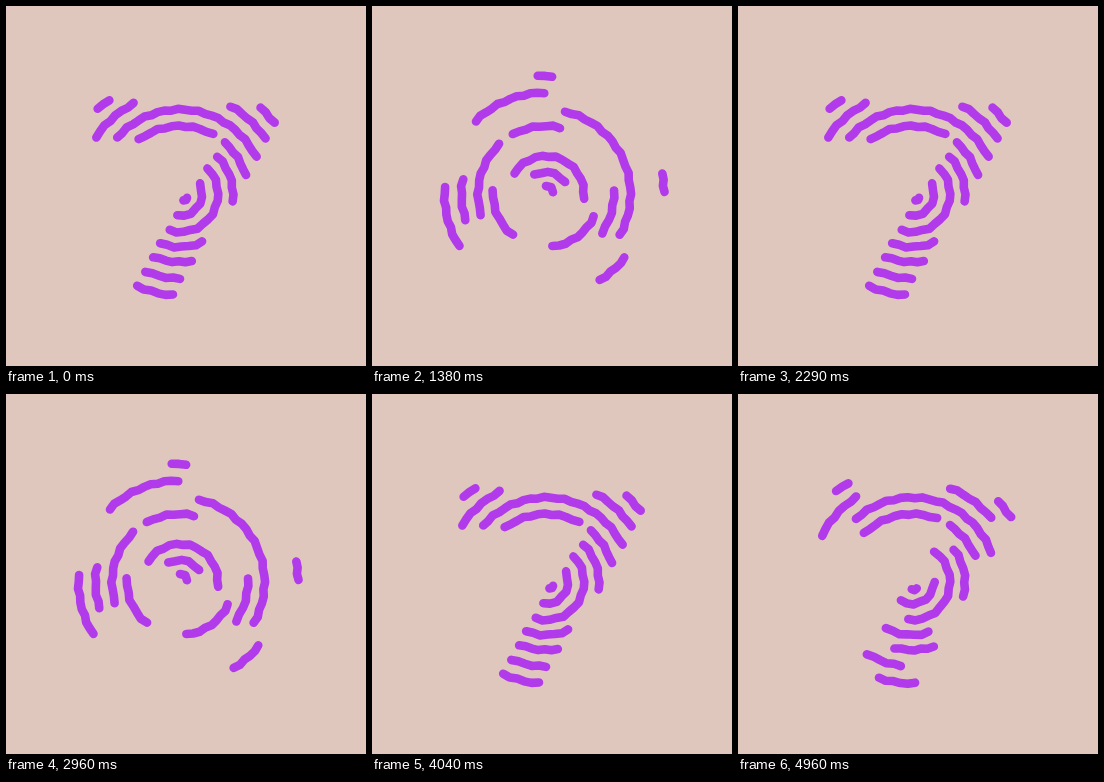
An HTML page with a canvas for the animation above (5000 ms loop, 360 by 360 pixels).

```html
<!DOCTYPE html>
<html lang="en">
<head>
<meta charset="utf-8">
<title>Seven</title>
<style>
html, body { margin: 0; width: 100%; height: 100%; overflow: hidden; background: #e0c7bd; }
canvas { display: block; width: 100vmin; height: 100vmin; }
</style>
</head>
<body>
<canvas id="stage" width="360" height="360"></canvas>
<script>
const ctx = document.getElementById('stage').getContext('2d');
const LOOP = 5000, CYCLE = 32, CX = 174, CY = 188;

// Arc angles in degrees: [start, end] at rest, half way back, and just after the spin.
const rings = [
  { r: 8, turn: 720, arcs: [[28, 62, 270, 346, 495, 495]] },
  { r: 22, turn: 720, arcs: [[-28, 97, 239, 328, 401, 512]] },
  { r: 38, turn: -360, arcs: [[-43, 106, -147, 7, -217, -76]] },
  { r: 53, turn: 360, arcs: [[-45, 8, 25, 83, 99, 159], [65, 112, 129, 184, 200, 262]] },
  { r: 68, turn: -360, arcs: [[233, 299, 162, 227, 129, 197], [311, 344, 241, 282, 207, 247], [80, 113, -3, 35, -56, -15]] },
  { r: 84.5, turn: 360, arcs: [[222, 334, 283, 389, 336, 455], [90, 114, 162, 190, 220, 220]] },
  { r: 101.5, turn: -360, arcs: [[300, 327, 226, 269, 166, 226], [94, 115, 39, 58, 15, 33], [214, 243, 149, 184, 94, 141]] },
  { r: 118, turn: 360, arcs: [[226, 233, 266, 273, 286, 286], [-47, -37, -10, -1, 10, 20]] }
];

// Uneven stepping: [time in ms, step reached]
const pace = [
  [0, 0], [40, 1], [540, 11], [580, 12], [1080, 21], [1130, 22], [1630, 34],
  [1670, 35], [2170, 46], [2250, 47], [2290, 48], [2380, 49], [2750, 55],
  [2790, 56], [2960, 60], [3290, 66], [3330, 67], [3580, 72], [3670, 73],
  [3790, 75], [3880, 76], [4380, 85], [4420, 86], [4920, 98], [4960, 99], [5000, 100]
];

const mix = (a, b, u) => a + (b - a) * u;

function stepAt(t) {
  let i = 0;
  while (i < pace.length - 2 && t >= pace[i + 1][0]) i++;
  const [t0, s0] = pace[i], [t1, s1] = pace[i + 1];
  return Math.floor(mix(s0, s1, (t - t0) / (t1 - t0)) + 0.02);
}

function phaseAt(step) {
  if (step < 8) return 8; // the first cycle opens at rest
  const p = (step - 3) % CYCLE;
  return p < 2 ? p + CYCLE : p;
}

function angleAt(rest, mid, far, turn, p) {
  if (p <= 13) return rest;
  if (p < 18) {
    const u = (p - 13) / 5;
    return mix(rest + turn, far, u * u * (3 - 2 * u));
  }
  if (p < 25) return mix(far, mid, (p - 18) / 7);
  return mix(rest, mid, Math.pow(Math.max(0, 1 - (p - 25) / 9), 1.5));
}

function drawArc(r, from, to, seed) {
  const a = from * Math.PI / 180, b = to * Math.PI / 180;
  const length = r * (b - a);
  if (length < 1.5) return;
  const n = Math.max(2, Math.round(length / 7));
  ctx.beginPath();
  for (let i = 0; i <= n; i++) {
    const angle = mix(a, b, i / n);
    const rr = r + 0.8 * Math.sin(i * 2.3 + seed * 1.9);
    ctx.lineTo(CX + rr * Math.cos(angle), CY + rr * Math.sin(angle));
  }
  ctx.stroke();
}

function draw(t) {
  const p = phaseAt(stepAt(t));
  ctx.fillStyle = '#e0c7bd';
  ctx.fillRect(0, 0, 360, 360);
  ctx.strokeStyle = '#b13aeb';
  ctx.lineWidth = 8.6;
  ctx.lineCap = ctx.lineJoin = 'round';
  rings.forEach(({ r, turn, arcs }, k) => arcs.forEach((a, j) => {
    const from = angleAt(a[0], a[2], a[4], turn, p);
    const to = angleAt(a[1], a[3], a[5], turn, p);
    drawArc(r, from, to, k + j * 3);
  }));
}

const start = performance.now();
function tick() {
  draw((performance.now() - start) % LOOP);
  requestAnimationFrame(tick);
}
tick();
</script>
</body>
</html>
```
